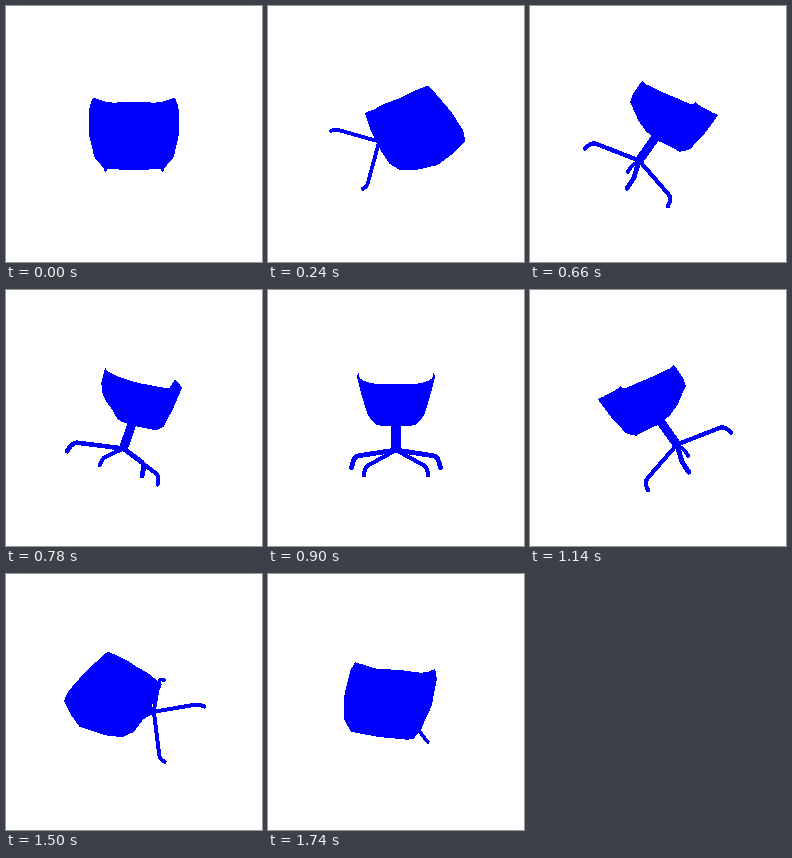
Animation of 256 by 256 pixels, one loop 1800 ms. Source, as an HTML page:

```html
<!DOCTYPE html>
<html lang="en">
<head>
<meta charset="utf-8">
<title>Turning chair</title>
<style>
  html, body { margin: 0; width: 100%; height: 100%; overflow: hidden; background: #fff; }
  svg { display: block; width: 100vw; height: 100vh; }
  path { stroke: #00f; stroke-linejoin: round; }
  .panel { fill: #00f; stroke-width: 1; }
  .leg { fill: none; stroke-linecap: round; }
</style>
</head>
<body>
<svg id="stage" viewBox="0 0 256 256" shape-rendering="crispEdges"></svg>
<script>
const LOOP = 1800, STEP = 60;
const CENTER = 128, DISTANCE = 228;
const rad = deg => deg * Math.PI / 180;
const AXIS = rad(32);   // lean of the turning axis towards the viewer
const TILT = rad(51);   // angle between that axis and the chair's pole
const HUB = -32.3;

// Half of the shell from front to back; each rib runs from rim to centre line.
// Points are [side, front, up].
const ribs = [
  [[35.2, 27, 34.4], [31.5, 29.5, 18], [27, 30, 9], [20, 30, 6], [0, 31, 6]],
  [[37.5, 19, 36], [32, 15, 16], [29, 14, 7], [19, 14, 0], [0, 14, -2]],
  [[36, -5, 44], [34, -5, 24], [29, -5, 6], [19, -5, -3], [0, -5, -5]],
  [[30, -24, 51], [29, -24, 25], [26, -20, 4], [20, -20, -1], [0, -20, -2]],
  [[22, -32.5, 54], [24, -32, 28], [22, -30, 8], [15, -28, 5], [0, -28, 4]],
  [[0, -33.5, 54.2], [0, -34, 28], [0, -31, 8], [0, -30, 7], [0, -28, 4]]
];

const stage = document.getElementById("stage");
function addPath(className) {
  const path = document.createElementNS("http://www.w3.org/2000/svg", "path");
  path.setAttribute("class", className);
  return stage.appendChild(path);
}

const panels = [], legs = [];
for (const side of [-1, 1]) {
  const mirror = ([s, f, u]) => [s * side, f, u];
  for (let i = 0; i < ribs.length - 1; i++) {
    for (let j = 0; j < 4; j++) {
      const corners = [ribs[i][j], ribs[i + 1][j], ribs[i + 1][j + 1], ribs[i][j + 1]];
      panels.push({ path: addPath("panel"), points: corners.map(mirror) });
    }
  }
  for (const front of [34.6, -37]) {
    const along = (k, drop) => [side * 34.6 * k, front * k, HUB - drop];
    legs.push({
      path: addPath("leg"),
      points: [along(0, 0), along(0.87, 10.5), along(0.98, 11.5), along(1, 20.5)]
    });
  }
}
const pole = { path: addPath("pole"), points: [[0, 0, -2], [0, 0, HUB - 1]] };

function project([s, f, u], turn) {
  const sin = Math.sin(turn), cos = Math.cos(turn);
  const a = u * Math.cos(TILT) + f * Math.sin(TILT);
  const b = u * Math.sin(TILT) - f * Math.cos(TILT);
  const depth = b * cos - s * sin;
  const x = s * cos + b * sin;
  const y = a * Math.cos(AXIS) - depth * Math.sin(AXIS);
  const z = a * Math.sin(AXIS) + depth * Math.cos(AXIS);
  const scale = DISTANCE / (DISTANCE - z);
  return { x: CENTER + x * scale, y: CENTER - y * scale, scale };
}

const at = p => p.x.toFixed(2) + " " + p.y.toFixed(2);

function render(time) {
  const turn = Math.floor(time % LOOP / STEP) * STEP / LOOP * 2 * Math.PI;
  const place = part => part.points.map(p => project(p, turn));

  for (const panel of panels) {
    panel.path.setAttribute("d", "M" + place(panel).map(at).join("L") + "Z");
  }
  for (const leg of legs) {
    const [hub, bend, knee, foot] = place(leg);
    leg.path.setAttribute("d", `M${at(hub)}L${at(bend)}Q${at(knee)} ${at(foot)}`);
    leg.path.setAttribute("stroke-width", 4.2 * (hub.scale + foot.scale) / 2);
  }
  const [top, bottom] = place(pole);
  pole.path.setAttribute("d", `M${at(top)}L${at(bottom)}`);
  pole.path.setAttribute("stroke-width", 8.6 * bottom.scale);
}

const start = performance.now();
function tick() {
  render(performance.now() - start);
  requestAnimationFrame(tick);
}
tick();
</script>
</body>
</html>
```
